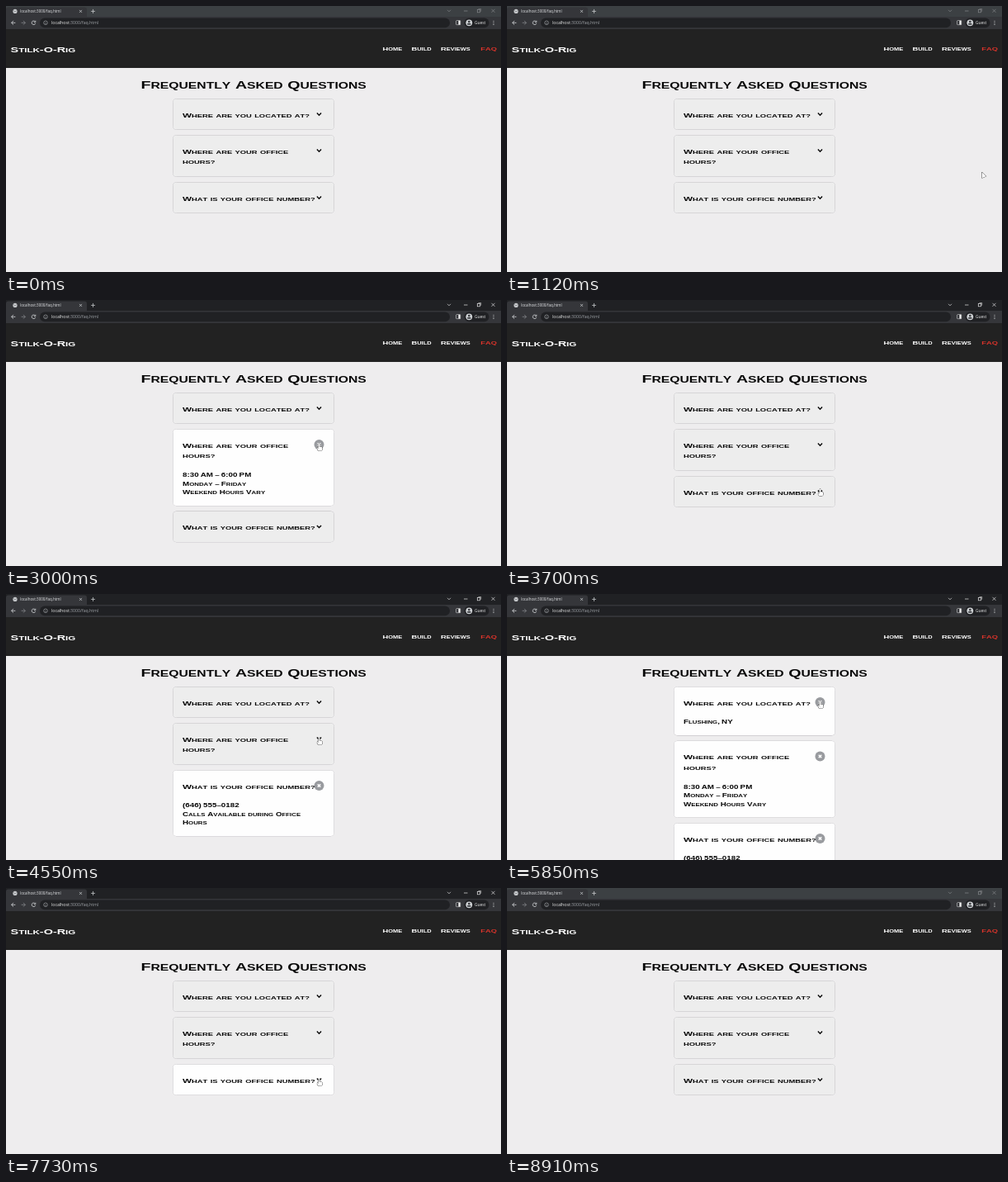
Write an HTML page with a canvas that moves like this. It is 600x322 px and loops after 9 s.

```html
<!DOCTYPE html>
<html lang="en">
<head>
<meta charset="utf-8">
<title>FAQ</title>
<style>
  html, body { margin: 0; width: 100%; height: 100%; overflow: hidden; background: #eeedee; }
  canvas { display: block; width: 100%; height: 100%; }
</style>
</head>
<body>
<canvas id="stage" width="600" height="322"></canvas>
<script>
const ctx = document.getElementById('stage').getContext('2d');
const LOOP = 9000, FADE = 300, TRAVEL = 480, FLICK = 150;
const WIDEN = 1.5, SMALL_CAP = 0.8;
const INK = '#080808', ICON = '#d5d7da', BAR = '#35363a', DARK = '#202124';
const LEFT = 202.5, WIDTH = 195, BUTTON_X = 379.5, BUTTON_Y = 18.4;
const OUTSIDE = [600, 210];

const cards = [
  { question: ['Where are you located at?'],
    answer: ['Flushing, NY'] },
  { question: ['Where are your office', 'hours?'],
    answer: ['8:30 AM – 6:00 PM', 'Monday – Friday', 'Weekend Hours Vary'] },
  { question: ['What is your office number?'],
    answer: ['(646) 555–0182', 'Calls Available during Office', 'Hours'] }
];

// each click toggles a card, and the pointer travels from click to click
const clicks = [
  [0, 1240], [0, 1940], [1, 2640], [1, 3240], [2, 3910],
  [1, 4700], [0, 5580], [0, 6210], [1, 6910], [2, 7730]
].map(([card, time]) => ({ card, time }));
const first = clicks[0], last = clicks[clicks.length - 1];

const mix = (a, b, p) => a + (b - a) * p;
const clamp = v => Math.max(0, Math.min(1, v));
const ease = p => p * p * (3 - 2 * p);

function layout(t) {
  let top = 112.5;
  return cards.map(({ question, answer }, i) => {
    const done = clicks.filter(c => c.card === i && c.time <= t);
    const open = done.length % 2 === 1;
    const fade = done.length ? 1 - (1 - clamp((t - done.at(-1).time) / FADE)) ** 2.6 : 1;
    const closed = 24 + 13 * question.length;
    const height = closed + (open ? 11.2 + 10.4 * answer.length : 0);
    const box = { question, answer, open, top, height, closed, white: open ? fade : 1 - fade };
    top += height + 7;
    return box;
  });
}

function pointerAt(t, boxes) {
  if (t < first.time - FLICK || t >= last.time + 2 * FLICK) return null;
  const spot = click => click ? [BUTTON_X, boxes[click.card].top + 17.5] : OUTSIDE;
  const from = clicks.findLast(c => c.time <= t);
  const to = clicks.find(c => c.time > t);
  let start = first.time - FLICK, span = FLICK;
  if (from) start = from.time + (to ? 40 : FLICK);
  if (from && to) span = TRAVEL;
  const p = ease(clamp((t - start) / span));
  const [x0, y0] = spot(from), [x1, y1] = spot(to);
  return [mix(x0, x1, p), mix(y0, y1, p)];
}

function rect(x, y, w, h, color) {
  ctx.fillStyle = color;
  ctx.fillRect(x, y, w, h);
}

function round(x, y, w, h, r, fill, edge, width = 1) {
  ctx.beginPath();
  ctx.roundRect(x, y, w, h, r);
  if (edge) {
    ctx.strokeStyle = edge;
    ctx.lineWidth = width;
    ctx.stroke();
  }
  ctx.fillStyle = fill;
  ctx.fill();
}

function disc(x, y, r, color) {
  round(x - r, y - r, 2 * r, 2 * r, r, color);
}

function ring(x, y, r, color, width, from = 0, to = 2 * Math.PI) {
  ctx.beginPath();
  ctx.arc(x, y, r, from, to);
  ctx.strokeStyle = color;
  ctx.lineWidth = width;
  ctx.stroke();
}

function line(color, width, ...points) {
  ctx.strokeStyle = color;
  ctx.lineWidth = width;
  ctx.beginPath();
  points.forEach(([x, y]) => ctx.lineTo(x, y));
  ctx.stroke();
}

function cross(x, y, r, color, width) {
  line(color, width, [x - r, y - r], [x + r, y + r]);
  line(color, width, [x + r, y - r], [x - r, y + r]);
}

function chevron(x, y, r, color, width) {
  line(color, width, [x - r, y - r / 2], [x, y + r / 2], [x + r, y - r / 2]);
}

function arrow(x, y, dir, color) {
  const tip = x + dir * 2.4;
  line(color, 0.8, [x - dir * 2.4, y], [tip, y]);
  line(color, 0.8, [x, y - 2.4], [tip, y], [x, y + 2.4]);
}

// extended small-caps lettering
function wide(text, x, y, size, color = INK) {
  ctx.save();
  ctx.translate(x, y);
  ctx.scale(WIDEN, 1);
  ctx.fillStyle = color;
  ctx.fontKerning = 'none';
  ctx.wordSpacing = `${size * 0.06}px`;
  let pen = 0;
  for (const run of text.match(/[a-z ?]+|[^a-z ?]+/g)) {
    const scale = /[a-z ?]/.test(run) ? SMALL_CAP : 1;
    ctx.font = `bold ${size * scale}px "Liberation Sans", Arial, sans-serif`;
    ctx.fillText(run.toUpperCase(), pen, 0);
    pen += ctx.measureText(run.toUpperCase()).width;
  }
  ctx.restore();
}

function label(text, x, y, size, color) {
  ctx.font = `${size}px "Open Sans", sans-serif`;
  ctx.fillStyle = color;
  ctx.fillText(text, x, y);
  return x + ctx.measureText(text).width;
}

function tabStrip(active) {
  const control = active ? '#e4e4e5' : '#85878a';
  rect(0, 0, 600, 14, active ? DARK : '#3c4043');
  round(0, 1.5, 98, 13, [3, 3, 0, 0], BAR);
  disc(11, 6.4, 2.6, '#c9cbce');
  chevron(11, 6.4, 1.6, '#55585c', 0.6);
  label('localhost:3000/faq.html', 17, 8.2, 4.5, '#e4e6e8');
  cross(90.5, 6.4, 1.5, ICON, 0.7);
  line(ICON, 0.7, [103, 6.4], [108, 6.4]);
  line(ICON, 0.7, [105.5, 3.9], [105.5, 8.9]);

  chevron(537, 5.8, 2, control, 0.7);
  line(control, 0.7, [555, 6], [559.5, 6]);
  ctx.strokeRect(571.3, 4.5, 3.3, 3.3);
  line(control, 0.6, [572.5, 3.5], [575.7, 3.5], [575.7, 6.7]);
  cross(590.5, 5.8, 2, control, 0.7);
}

function toolbar() {
  const y = 20.3;
  rect(0, 13, 600, 15, BAR);
  arrow(9, y, -1, ICON);
  arrow(21, y, 1, '#85878b');
  ring(33.5, y, 2.3, ICON, 0.8, 0.3, 5.5);
  line(ICON, 0.8, [35.8, y - 2.6], [35.8, y - 0.7], [33.9, y - 0.7]);

  round(41, 14.6, 497, 11.6, 5.8, DARK);
  ring(48, y, 2.3, '#b2b5b9', 0.6);
  line('#b2b5b9', 0.6, [48, y - 0.3], [48, y + 1.3]);
  const end = label('localhost', 55, 22.3, 5.2, '#eceded');
  label(':3000/faq.html', end, 22.3, 5.2, '#a0a4a9');

  round(545.8, 17.8, 4.8, 4.8, 0.3, BAR, '#f1f1f1', 0.9);
  rect(548.4, 17.8, 2.2, 4.8, '#f1f1f1');
  round(555.5, 14.6, 30, 11.6, 5.8, DARK);
  disc(561.3, y, 3.9, '#cfd2d5');
  disc(561.3, y - 1.2, 1.4, '#3a3c40');
  round(559, y + 0.8, 4.6, 1.7, 0.8, '#3a3c40');
  label('Guest', 568, 22.1, 4.8, '#eceded');
  for (let i = -1; i <= 1; i++) disc(591, y + 2.1 * i, 0.55, ICON);
}

function siteHeader() {
  rect(0, 28, 600, 47, '#222222');
  wide('Stilk-O-Rig', 5.5, 55.8, 9.65, '#ffffff');
  const nav = { Home: 456.5, Build: 491.5, Reviews: 527, FAQ: 575.3 };
  for (const [name, x] of Object.entries(nav)) {
    wide(name, x, 54.3, 6.22, name === 'FAQ' ? '#d9342b' : '#ffffff');
  }
}

function drawCard({ question, answer, open, top, height, closed, white }) {
  const shade = mix(237, 254, white);
  round(LEFT, top, WIDTH, height, 4, `rgb(${shade}, ${shade}, ${shade})`, '#bfbdc1');
  question.forEach((text, i) => wide(text, 214, top + 22.2 + i * 12.6, 7.82));
  const y = top + BUTTON_Y;
  if (open) {
    answer.forEach((text, i) => wide(text, 214, top + closed + 7.8 + i * 10.4, 6.54));
    disc(BUTTON_X, y, 6, '#999b9f');
    cross(BUTTON_X, y, 1.7, '#ffffff', 1.5);
  } else {
    chevron(BUTTON_X, y, 2.6, INK, 1.4);
  }
}

function drawPointer([x, y], hand) {
  const edge = '#333333', fill = '#ffffff';
  if (hand) {
    round(x - 2.1, y + 3.6, 5.8, 4.8, 1.6, fill, edge, 0.9);
    round(x - 0.7, y, 1.5, 6, 0.7, fill, edge, 0.7);
    rect(x - 0.6, y + 4, 3.4, 2.6, fill);
    return;
  }
  ctx.fillStyle = fill;
  line(edge, 0.9, [x, y], [x, y + 7], [x + 4.9, y + 5], [x, y]);
  ctx.fill();
}

function draw(t) {
  rect(0, 0, 600, 322, '#eeedee');
  tabStrip(t >= first.time && t < 8910);
  toolbar();
  siteHeader();
  wide('Frequently Asked Questions', 163.5, 99.6, 13.1);

  const boxes = layout(t);
  boxes.forEach(drawCard);
  const pointer = pointerAt(t, boxes);
  if (pointer) {
    const [x, y] = pointer;
    const hand = boxes.some(b => Math.hypot(x - BUTTON_X, y - b.top - BUTTON_Y) < 8);
    drawPointer(pointer, hand);
  }
}

const start = performance.now();
function tick() {
  draw((performance.now() - start) % LOOP);
  requestAnimationFrame(tick);
}
tick();
</script>
</body>
</html>
```
